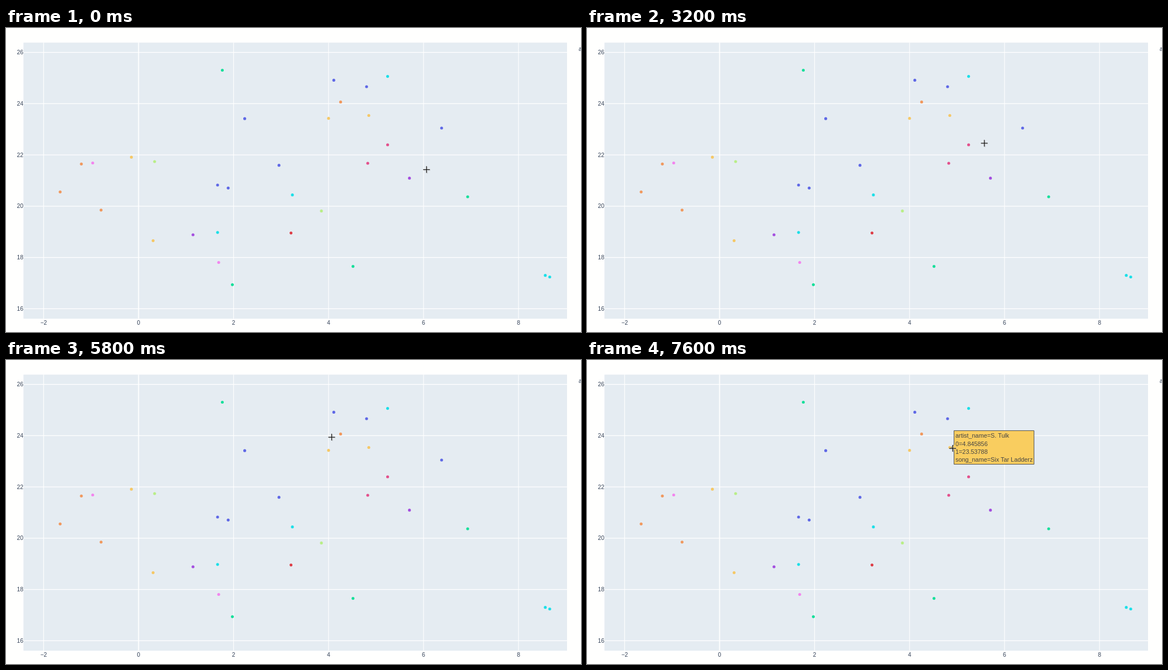
An HTML page that plays this animation: 1030x544 px, repeating every 8 s.

```html
<!DOCTYPE html>
<html lang="en">
<head>
<meta charset="utf-8">
<title>Scatter plot hover</title>
<style>
html, body { margin: 0; width: 100%; height: 100%; overflow: hidden; background: #fffffe; }
svg { display: block; width: 1030px; height: 544px; font-family: "Liberation Sans", Arial, sans-serif; }
.axis { font-size: 10.4px; fill: #36445a; }
.tip { font-size: 10.87px; }
</style>
</head>
<body>
<svg id="stage" viewBox="0 0 1030 544">
  <rect width="1030" height="544" fill="#fffffe"/>
  <rect x="31.3" y="26.2" width="973.7" height="494" fill="#e5ecf2"/>
  <g id="grid" stroke="#fff"></g>
  <g id="labels" class="axis"></g>
  <g id="dots"></g>
  <g id="tips" class="tip"></g>
  <g id="cursor" fill="none">
    <path d="M-5.5 1.3H6.5M1.3 -5V7" stroke="#777" stroke-opacity=".3" stroke-width="1.6"/>
    <path d="M-6 0H6M0 -6V6" stroke="#fff" stroke-opacity=".55" stroke-width="2.6"/>
    <path d="M-6 0H6M0 -6V6" stroke="#111" stroke-width="1.25"/>
  </g>
</svg>
<script>
const LOOP = 8000, STEP = 100;
const $ = id => document.getElementById(id);

function add(parent, tag, attrs, text) {
  const el = document.createElementNS("http://www.w3.org/2000/svg", tag);
  for (const k in attrs) el.setAttribute(k, attrs[k]);
  if (text) el.textContent = text;
  parent.appendChild(el);
  return el;
}

// Axes
const px = v => 237.5 + v * 85.07;
const py = v => 43.6 + (26 - v) * 45.88;

for (let v = -2; v <= 8; v += 2) {
  const x = px(v);
  add($("grid"), "path", { d: `M${x} 26.2V520.2`, "stroke-width": v ? 1.1 : 1.8 });
  add($("labels"), "text", { x, y: 531.4, "text-anchor": "middle" }, String(v).replace("-", "\u2212"));
}
for (let v = 16; v <= 26; v += 2) {
  const y = py(v);
  add($("grid"), "path", { d: `M31.3 ${y}H1005`, "stroke-width": 1.1 });
  add($("labels"), "text", { x: 31, y: y + 3.6, "text-anchor": "end" }, String(v));
}
add($("labels"), "text", { x: 1025.7, y: 41.4 }, "artist_name");

// Points, grouped by colour
const groups = [
  ["#5f68e6", [587.2, 93.4, 645.9, 105, 427.6, 162.2, 780.3, 179, 489, 245.7, 379, 281, 398, 286.3]],
  ["#dd3d46", [510.5, 366.8]],
  ["#17df9b", [387.5, 75.5, 827, 302, 621.6, 426.6, 405.5, 459.3]],
  ["#a44fdf", [722.7, 268.7, 335, 370]],
  ["#f0995f", [599.4, 132.4, 135, 243.3, 97, 293.3, 170.3, 325.8]],
  ["#1cdfe8", [683.6, 86.6, 513, 298.7, 379, 365.8, 966, 442.7, 974, 445.5]],
  ["#e3508c", [683.6, 209, 648, 242]],
  ["#b9ee88", [266.2, 239, 565, 327.4]],
  ["#f286ee", [155.3, 241.5, 381, 419.5]],
  ["#f5c867", [577.8, 161.7, 649.9, 156.5, 224.6, 231.2, 263.5, 380.6]]
];
for (const [fill, p] of groups)
  for (let i = 0; i < p.length; i += 2)
    add($("dots"), "circle", { cx: p[i], cy: p[i + 1], r: 2.6, fill });

// Hover labels
const tips = [
  { x: 722.7, y: 268.7, fill: "#ab63fa", spans: [[1000, 1300]],
    lines: ["Nimrel", "5.704327", "21.09512", "Quilt Parade"] },
  { x: 780.3, y: 179, fill: "#636efa", ink: "#fff", spans: [[1700, 2700]],
    lines: ["Osk", "6.380614", "23.04916", "Moth Loft"] },
  { x: 683.6, y: 209, fill: "#f0608f", spans: [[3300, 4100]],
    lines: ["Brolin Ash", "5.244172", "22.39483", "Copper Streets (feat. Ondra Vey)"] },
  { x: 648, y: 242, fill: "#f0608f", spans: [[4200, 4600]],
    lines: ["Brolin Ash", "4.825736", "21.67591", "Pocket Weather Almanacs (feat. Ondra Vey)"] },
  { x: 577.8, y: 161.7, fill: "#f9cd5f", spans: [[5000, 5800]],
    lines: ["S. Tulk", "4.000318", "23.42604", "Clay Radio"] },
  { x: 599.4, y: 132.4, fill: "#f59a61", spans: [[6000, 6900]],
    lines: ["Dorv", "4.25045", "24.06477", "Kilnward (feat. Torva Dun)"] },
  { x: 649.9, y: 156.5, fill: "#f9cd5f", spans: [[7100, 7300], [7500, LOOP]],
    lines: ["S. Tulk", "4.845856", "23.53788", "Six Tar Ladderz"] }
];
const keys = ["artist_name", "0", "1", "song_name"];

for (const tip of tips) {
  const ink = tip.ink || "#444";
  tip.el = add($("tips"), "g", { transform: `translate(${tip.x + 2.5} ${tip.y})` });
  const box = add(tip.el, "path", { fill: tip.fill, stroke: ink, "stroke-width": 0.95 });
  const widths = tip.lines.map((line, i) =>
    add(tip.el, "text", { x: 7.6, y: -17.1 + i * 14.1, fill: ink }, keys[i] + "=" + line)
      .getComputedTextLength());
  const w = Math.max(...widths) + 5;
  box.setAttribute("d", `M0 0L5 -5V-30.1h${w}V30.1h${-w}V5Z`);
}

// Pointer path: time, x, y
const path = [
  [0, 753.3, 253.3], [500, 753.3, 253.3], [600, 742, 215], [700, 715, 183],
  [800, 691, 240], [900, 703, 298], [1000, 723, 281], [1200, 723, 281],
  [1300, 726, 290], [1500, 759.2, 219], [1700, 770, 192], [1900, 773, 183],
  [2400, 773, 183], [2500, 779, 185], [2600, 779, 185], [2900, 739, 205],
  [3200, 711.7, 206.2], [3500, 685.5, 209], [4000, 685.5, 209], [4300, 654, 239],
  [4500, 654, 239], [4700, 647, 236], [5000, 587, 175], [5200, 587, 175],
  [5300, 570, 159], [5700, 570, 159], [5800, 583.4, 138], [6400, 615, 128],
  [6800, 615, 128], [7100, 663, 160], [7200, 663, 160], [7600, 655, 158],
  [LOOP, 655, 158]
];

function pointAt(t) {
  const i = path.findIndex(k => k[0] > t);
  const [t0, x0, y0] = path[i - 1], [t1, x1, y1] = path[i];
  const f = (t - t0) / (t1 - t0);
  return [x0 + (x1 - x0) * f, y0 + (y1 - y0) * f];
}

function render(now) {
  const t = Math.floor((now % LOOP) / STEP) * STEP;
  $("cursor").setAttribute("transform", `translate(${pointAt(t).join(" ")})`);
  for (const tip of tips) {
    const on = tip.spans.some(([a, b]) => t >= a && t < b);
    tip.el.setAttribute("visibility", on ? "visible" : "hidden");
  }
}

const start = performance.now();
function tick() {
  render(performance.now() - start);
  requestAnimationFrame(tick);
}
tick();
</script>
</body>
</html>
```
